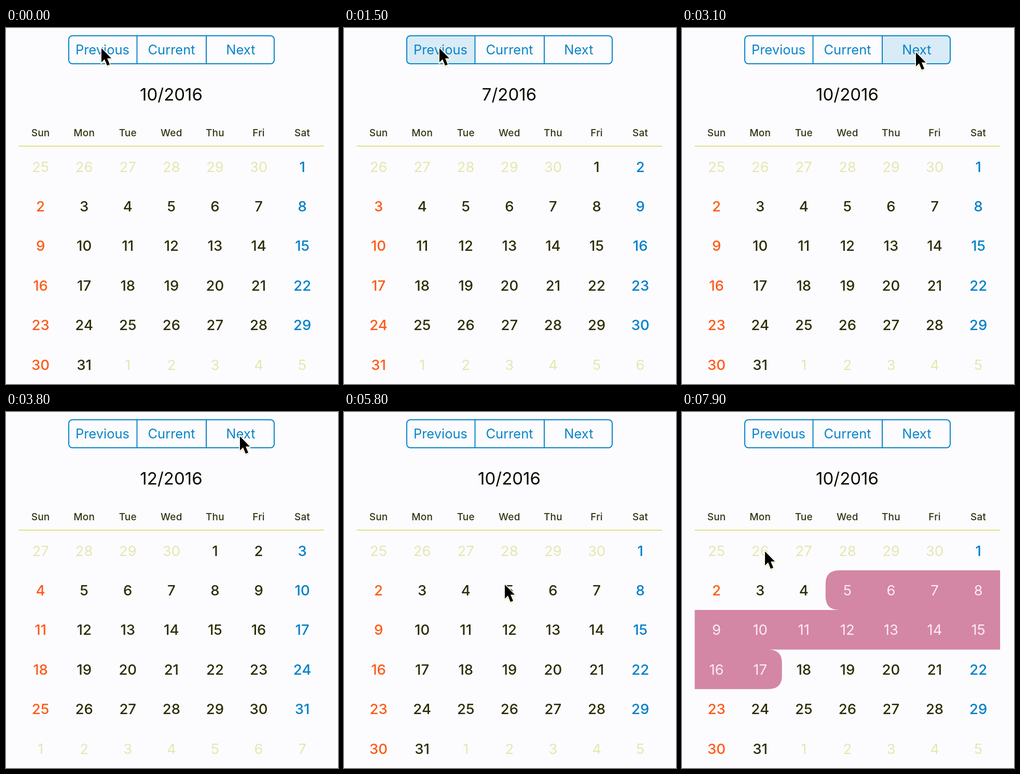
An HTML page for the animation above (8000 ms loop, 640 by 687 pixels).

```html
<!DOCTYPE html>
<html lang="en">
<head>
<meta charset="utf-8">
<title>Month calendar</title>
<style>
  html, body { margin: 0; width: 100%; height: 100%; overflow: hidden; background: #fcfcff; }
  svg { display: block; width: 640px; height: 687px; }
  text { font-family: Inter, Roboto, sans-serif; text-anchor: middle; }
  .tab { font-size: 25.5px; fill: #0a84c6; }
  .title { font-size: 33px; fill: #0a0a00; }
  .week { font-size: 19px; font-weight: 500; letter-spacing: .2px; fill: #333312; }
  .day { font-size: 27.5px; font-weight: 500; fill: #2d2d05; }
  .day.sun { fill: #ff5a16; }
  .day.sat { fill: #0080c8; }
  .day.out { fill: #e6e6b2; font-weight: 400; }
  .day.on { fill: #fcecf3; font-weight: 400; }
</style>
</head>
<body>
<svg id="stage" viewBox="0 0 640 687"></svg>
<script>
const LOOP = 8000, TICK = 100;
const LEFT = 24.5, TOP = 229.2, COL = 84.1, ROW = 76.4, ROUND = 26;
const EDGES = [121, 252.5, 386, 517];

// Tab presses: time, tab, year, month
const PRESSES = [
  [400, 0, 2016, 9], [800, 0, 2016, 8], [1200, 0, 2016, 7], [1600, 0, 2016, 6],
  [2400, 1, 2016, 10],
  [3200, 2, 2016, 11], [3600, 2, 2016, 12], [4000, 2, 2017, 1],
  [4300, 2, 2017, 2], [4600, 2, 2017, 3],
  [5200, 1, 2016, 10]
];

// Selected days: time, first, last
const RANGES = [[6100, 5, 5], [6900, 5, 17]];

// Pointer tip: time, x, y
const PATH = [
  [0, 184, 39], [1800, 184, 39], [2100, 341, 32], [2500, 341, 32],
  [2900, 451, 47], [4600, 451, 47], [4900, 319, 31], [5400, 319, 31],
  [5800, 310, 333], [6200, 310, 333], [6700, 162, 488], [7200, 162, 488],
  [7700, 160, 269], [8000, 160, 269]
];

const stage = document.getElementById('stage');

function add(tag, attrs, content) {
  const el = document.createElementNS('http://www.w3.org/2000/svg', tag);
  for (const key in attrs) el.setAttribute(key, attrs[key]);
  if (content) el.textContent = content;
  stage.appendChild(el);
  return el;
}

const label = (cls, x, y, content) => add('text', { class: cls, x, y }, content);
const colX = c => LEFT + COL * c;
const rowY = r => TOP + ROW * r;

const press = add('rect', { y: 15, height: 54, fill: '#0a84c6', 'fill-opacity': .15 });
add('rect', { x: 121, y: 15, width: 396, height: 54, rx: 7, fill: 'none', stroke: '#0a84c6', 'stroke-width': 2 });
add('path', { d: 'M252.5 15V69M386 15V69', stroke: '#0a84c6', 'stroke-width': 2 });
['Previous', 'Current', 'Next'].forEach((name, i) => label('tab', [186, 319, 452.5][i], 51, name));

const title = label('title', 318.5, 140, '');
['Sun', 'Mon', 'Tue', 'Wed', 'Thu', 'Fri', 'Sat'].forEach((name, c) => label('week', colX(c + .5), 209, name));
add('path', { d: 'M24.5 228H613', stroke: '#e0e08c', 'stroke-width': 2 });

const band = add('path', { fill: '#d486a5' });
const days = Array.from({ length: 42 }, (_, i) =>
  label('day', colX(i % 7 + .5), rowY(Math.floor(i / 7)) + 48.3, ''));

const ARROW = 'M0 0V27L6 21.3L11 33.5L16 31.4L11 19.5H19Z';
const shadow = add('path', { d: ARROW, fill: '#eeeeb0', stroke: '#eeeeb0', 'stroke-width': 3, 'stroke-linejoin': 'round' });
const pointer = add('path', { d: ARROW, fill: '#000', stroke: '#fdfdf2', 'stroke-width': 3, 'paint-order': 'stroke' });

const latest = (list, t) => list.filter(item => item[0] <= t).pop();

function pointerAt(t) {
  const i = Math.max(1, PATH.findIndex(p => p[0] > t));
  const [t0, x0, y0] = PATH[i - 1], [t1, x1, y1] = PATH[i];
  const k = (t - t0) / (t1 - t0), e = k * k * (3 - 2 * k);
  return [x0 + (x1 - x0) * e, y0 + (y1 - y0) * e];
}

// One row piece, with its open ends rounded
function piece(r, c0, c1, roundLeft, roundRight) {
  const x0 = colX(c0), x1 = colX(c1 + 1), y0 = rowY(r), y1 = rowY(r + 1);
  const a = roundLeft ? ROUND : 0, b = roundRight ? ROUND : 0;
  return `M${x0 + a} ${y0}H${x1 - b}Q${x1} ${y0} ${x1} ${y0 + b}V${y1 - b}Q${x1} ${y1} ${x1 - b} ${y1}` +
    `H${x0 + a}Q${x0} ${y1} ${x0} ${y1 - a}V${y0 + a}Q${x0} ${y0} ${x0 + a} ${y0}Z`;
}

function bandPath(first, last) {
  let d = '';
  for (let r = Math.floor(first / 7); r <= Math.floor(last / 7); r++) {
    const a = Math.max(first, r * 7), b = Math.min(last, r * 7 + 6);
    d += piece(r, a % 7, b % 7, a === first, b === last);
  }
  return d;
}

function draw(t) {
  const [, , year, month] = latest(PRESSES, t) || [0, 0, 2016, 10];
  const offset = new Date(Date.UTC(year, month - 1, 1)).getUTCDay();
  const range = latest(RANGES, t);
  const first = range ? range[1] + offset - 1 : 99;
  const last = range ? range[2] + offset - 1 : -1;

  title.textContent = month + '/' + year;
  band.setAttribute('d', range ? bandPath(first, last) : '');
  days.forEach((el, i) => {
    const date = new Date(Date.UTC(year, month - 1, 1 - offset + i));
    let kind = i % 7 === 0 ? 'sun' : i % 7 === 6 ? 'sat' : '';
    if (date.getUTCMonth() !== month - 1) kind = 'out';
    if (i >= first && i <= last) kind = 'on';
    el.textContent = date.getUTCDate();
    el.setAttribute('class', 'day ' + kind);
  });

  const held = PRESSES.find(p => t >= p[0] - 100 && t < p[0] + 100);
  press.setAttribute('visibility', held ? 'visible' : 'hidden');
  if (held) {
    press.setAttribute('x', EDGES[held[1]]);
    press.setAttribute('width', EDGES[held[1] + 1] - EDGES[held[1]]);
  }

  const [x, y] = pointerAt(t);
  pointer.setAttribute('transform', `translate(${x} ${y})`);
  shadow.setAttribute('transform', `translate(${x} ${y + 2})`);
}

const start = performance.now();
let shown = -1;
function loop() {
  const t = Math.floor((performance.now() - start) % LOOP / TICK) * TICK;
  if (t !== shown) draw(shown = t);
  requestAnimationFrame(loop);
}
loop();
</script>
</body>
</html>
```
